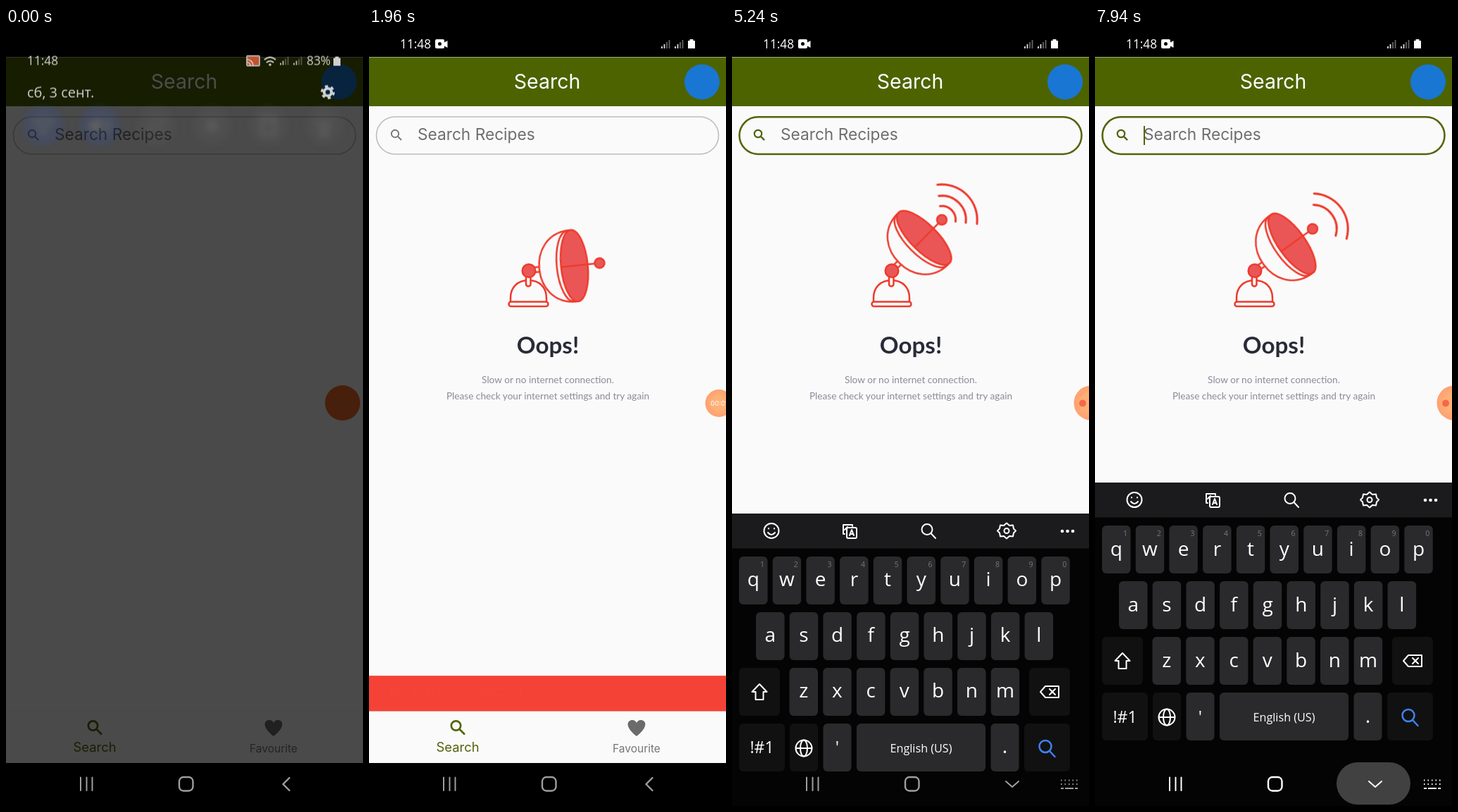
An HTML page for the animation above (8 s loop, 507x1104 px).

```html
<!DOCTYPE html>
<html lang="en">
<head>
<meta charset="utf-8">
<title>Recipe search</title>
<style>
html,body{margin:0;width:100%;height:100%;overflow:hidden;background:#000}
svg{display:block;width:100%;height:100%}
text{font-family:"Open Sans","Noto Sans",sans-serif;fill:#fff}
.geo text{font-family:Inter,sans-serif}
.geo .sans{font-family:"Open Sans",sans-serif}
.geo .lato{font-family:Lato,sans-serif;fill:#8b8b99}
.geo .rob{font-family:Roboto,sans-serif;fill:#fff2f0}
.mid{text-anchor:middle}
.ln{fill:none;stroke:#fff;stroke-width:2;stroke-linecap:round;stroke-linejoin:round}
.red{stroke:#ee3a2c;stroke-width:2.5;stroke-linecap:round;fill:none}
.wave{stroke-width:3}
.rf{fill:#ea5656}.wf{fill:#fafafa}
.olive{stroke:#52650a}
.a,.s{animation:8s linear infinite}
.s{animation-timing-function:step-end}

/* notification panel */
#app{animation-name:blur}
@keyframes blur{0%{filter:blur(.4px)}5%,16.25%{filter:blur(15px)}20.9%,100%{filter:blur(0)}}
#dim{animation-name:dim}
@keyframes dim{0%,16.25%{opacity:.7}20.9%,100%{opacity:0}}
#bar{animation-name:bar}
@keyframes bar{0%,18%{opacity:0}20.9%,100%{opacity:1}}
#head{animation-name:head}
@keyframes head{0%{opacity:.8;transform:translateY(-10.5px);animation-timing-function:ease-out}8%,16.25%{opacity:1;transform:none}20%,100%{opacity:0;transform:translateY(-14px)}}
#tiles{animation-name:tiles}
@keyframes tiles{0%{opacity:.12;filter:blur(4px);transform:translateY(-21px);animation-timing-function:ease-out}9%,16.25%{opacity:1;filter:blur(0);transform:none}20%,100%{opacity:0;filter:blur(0);transform:translateY(-30px)}}
#rest{animation-name:rest}
@keyframes rest{0%{opacity:0;transform:translateY(-50px)}2%{opacity:0;transform:translateY(-40px);animation-timing-function:ease-out}10.75%,16.25%{opacity:1;transform:none}19.5%,100%{opacity:0;transform:translateY(-50px)}}
#cast{animation-name:cast}
@keyframes cast{0%{transform:translateX(-22px)}11.9%{transform:none}}
#wifi{animation-name:wifi}
@keyframes wifi{0%{opacity:1}11.9%{opacity:0}}
#wtile{animation-name:wtile}
@keyframes wtile{0%,13.5%{fill:#2f64f5}14.8%,100%{fill:#6b6b6b}}

/* offline page */
#oops{animation-name:oops}
@keyframes oops{0%{opacity:0}22.2%{opacity:1}}
#dish{transform-origin:227px 344px;animation-name:dish}
@keyframes dish{0%,24.5%{transform:rotate(-5.7deg)}26.9%,39.5%{transform:rotate(-45.3deg)}41.75%{transform:rotate(-35.7deg)}45.4%{transform:rotate(-20.2deg)}46.75%{transform:rotate(-5.7deg)}48.9%,68.25%{transform:rotate(-45.3deg)}70.5%{transform:rotate(-35.7deg)}74.1%{transform:rotate(-20.2deg)}75.5%{transform:rotate(-5.7deg)}77.6%,97%{transform:rotate(-45.3deg)}99.25%,100%{transform:rotate(-35.7deg)}}
#w1{animation-name:w1}
@keyframes w1{0%{opacity:0}28.4%{opacity:1}40.2%{opacity:0}54%{opacity:1}69%{opacity:0}79.1%{opacity:1}97.75%{opacity:0}}
#w2{animation-name:w2}
@keyframes w2{0%{opacity:0}30.2%{opacity:1}43.9%{opacity:0}55.4%{opacity:1}72.6%{opacity:0}82%{opacity:1}}
#w3{animation-name:w3}
@keyframes w3{0%{opacity:0}33.9%{opacity:1}46%{opacity:0}58.2%{opacity:1}74.75%{opacity:0}84.9%{opacity:1}}
#snack{animation-name:snack}
@keyframes snack{0%,22.56%{transform:translateY(57px);animation-timing-function:cubic-bezier(.4,0,.2,1)}25.7%,45.75%{transform:none;animation-timing-function:ease-in}48.9%,100%{transform:translateY(57px)}}
#snacktext{animation-name:snacktext}
@keyframes snacktext{0%,24.5%{opacity:0}26%,45.75%{opacity:1}47.5%,100%{opacity:0}}

/* search field */
#focus{animation-name:focus}
@keyframes focus{0%{opacity:0}58.75%{opacity:1}}
#hint{animation-name:hint}
@keyframes hint{0%,73.4%{opacity:1}75%,89.4%{opacity:0}91.9%,100%{opacity:1}}
#c1{animation-name:c1}
@keyframes c1{0%{opacity:0}73.4%{opacity:1}76.9%{opacity:0}}
#c2{animation-name:c2}
@keyframes c2{0%{opacity:0}76.9%{opacity:1}89.4%{opacity:0}}
#clear{animation-name:clear}
@keyframes clear{0%{opacity:0}73.4%{opacity:1}89.4%{opacity:0}}
#caret{animation-name:caret}
@keyframes caret{0%{opacity:0}58.75%{opacity:1}65%{opacity:0}71.2%{opacity:1;transform:none}73.4%{transform:translateX(13.5px)}76.9%{opacity:1;transform:translateX(27px)}83.1%{opacity:0;transform:translateX(27px)}89.4%{opacity:1;transform:none}93.5%{opacity:0}98.7%{opacity:1}}

/* recorder bubble */
#b1{animation-name:b1}
@keyframes b1{0%{opacity:1}21.25%{opacity:0}}
#b2{animation-name:b2}
@keyframes b2{0%{opacity:0}21.25%{opacity:1}64%{opacity:0}}
#b3{animation-name:b3}
@keyframes b3{0%{opacity:0}64%{opacity:1}}
#t1{animation-name:t1}
@keyframes t1{0%{opacity:1}37.5%{opacity:0}}
#t2{animation-name:t2}
@keyframes t2{0%{opacity:0}37.5%{opacity:1}51.75%{opacity:0}}
#t3{animation-name:t3}
@keyframes t3{0%{opacity:0}51.75%{opacity:1}}

/* keyboard and system bar */
#kb{animation-name:kb}
@keyframes kb{0%,62.6%{transform:translateY(460px);animation-timing-function:ease-out}66.5%,100%{transform:none}}
#kc{animation-name:kc}
@keyframes kc{0%{opacity:0}71.9%{opacity:.25}73.7%{opacity:0}}
#kh{animation-name:kh}
@keyframes kh{0%{opacity:0}75.6%{opacity:.25}77%{opacity:0}}
#kgo{animation-name:kgo}
@keyframes kgo{0%{opacity:0}87.1%{opacity:.2}88.8%{opacity:0}}
#back{animation-name:back}
@keyframes back{0%{opacity:1}62.6%{opacity:0}}
#down{animation-name:down}
@keyframes down{0%{opacity:0}62.6%{opacity:1}}
#pill{animation-name:pill}
@keyframes pill{0%,97.5%{opacity:0}98.75%,100%{opacity:1}}
#nav{animation-name:nav}
@keyframes nav{0%,97.5%{opacity:.62}98.75%,100%{opacity:1}}
</style>
</head>
<body>
<svg viewBox="0 0 507 1104" preserveAspectRatio="none">
<defs>
  <g id="mag"><circle cx="-2" cy="-2" r="5.2"/><path d="M2 2L7 7"/></g>
  <g id="gear" fill="none"><circle r="5.2" stroke-width="4"/><circle r="8.3" stroke-width="3.4" stroke-dasharray="4.35 4.35"/></g>
  <g id="sig" stroke-width="1.8"><path d="M1 12V9M4.5 12V6" stroke="#ddd"/><path d="M8 12V3M11.5 12V0" stroke="#666"/></g>
  <path id="bat" fill="#fff" d="M2.5 0h5v2h2.5v11h-10v-11h2.5z"/>
  <path id="chev" class="ln" d="M-6-3L0 3L6-3"/>
  <radialGradient id="glow"><stop offset=".5" stop-color="#ffb077"/><stop offset="1" stop-color="#ffa070"/></radialGradient>
</defs>
<rect width="507" height="1104"/>

<g id="app" class="a geo">
  <rect x="-60" y="-60" width="627" height="1224"/>
  <rect x="-60" y="41" width="627" height="1002" fill="#fafafa"/>
  <rect x="-60" y="41.5" width="627" height="69.5" fill="#4d6300"/>
  <text class="mid" x="253" y="85.500" font-size="28.500">Search</text>
  <circle cx="473" cy="76.500" r="25" fill="#1976d2"/>
  <g id="bar" class="a">
    <text class="sans" x="44" y="29" font-size="17.300">11:48</text>
    <rect x="94" y="16" width="13" height="13" rx="2" fill="#fff"/>
    <path d="M106 21l5.500-3v10l-5.500-3z" fill="#fff"/><circle cx="100.500" cy="22.500" r="2.500"/>
    <use href="#sig" x="415" y="17"/><use href="#sig" x="434" y="17"/><use href="#bat" x="453" y="16"/>
  </g>

  <rect x="10.500" y="126" width="486" height="53" rx="26.500" fill="none" stroke="#bdbdbd" stroke-width="1.600"/>
  <use href="#mag" x="39" y="152" fill="none" stroke="#757575" stroke-width="1.900"/>
  <text id="hint" class="a" x="69" y="159" font-size="22.700" style="fill:#6e6e6e">Search Recipes</text>
  <g id="focus" class="s">
    <rect x="10.500" y="126.300" width="486" height="52.600" rx="26.300" fill="none" class="olive" stroke-width="2.500"/>
    <use href="#mag" x="39" y="152" fill="none" class="olive" stroke-width="2.200"/>
  </g>
  <text id="c1" class="s" x="69" y="159" font-size="22.700" style="fill:#222">c</text>
  <text id="c2" class="s" x="69" y="159" font-size="22.700" style="fill:#222">ch</text>
  <g id="clear" class="s"><circle cx="467.500" cy="152.500" r="9.500" fill="#4d6300"/><path class="ln" d="M464 149l7 7m0-7l-7 7"/></g>
  <rect id="caret" class="s" x="69" y="139" width="2" height="27" fill="#52650a"/>

  <g id="oops" class="s">
    <path class="red" d="M201 388V383C201 367 212 358 226.500 358S252 367 252 383V388"/>
    <rect class="red wf" x="198.500" y="388.500" width="56" height="6.500" rx="3.200"/>
    <rect class="red wf" x="223" y="350" width="6.500" height="16.500" rx="3"/>
    <g id="dish" class="a"><g transform="translate(227 344)">
      <rect class="red wf" x="7" y="-3.500" width="12" height="7"/>
      <path class="red wf" d="M62-51C30-50 15-25 15 0S30 50 62 51"/>
      <ellipse class="red wf" cx="60" rx="20" ry="50.500"/>
      <ellipse class="red rf" cx="65" rx="19" ry="51"/>
      <path class="red" d="M48 0H94"/>
      <circle class="red rf" cx="101" r="7"/>
      <g transform="translate(101 0)">
        <path id="w1" class="s red wave" d="M12-15.500A19.500 19.500 0 0 1 12 15.500"/>
        <path id="w2" class="s red wave" d="M21-27A34.200 34.200 0 0 1 21 27"/>
        <path id="w3" class="s red wave" d="M31-39.500A50.200 50.200 0 0 1 31 39.500"/>
      </g>
    </g></g>
    <circle class="red rf" cx="227" cy="344.500" r="9.300"/>
    <text class="mid lato" x="254" y="461.500" font-size="33.200" font-weight="700" style="fill:#2a2b38">Oops!</text>
    <g font-size="13.650" class="mid">
      <text class="lato" x="254" y="504">Slow or no internet connection.</text>
      <text class="lato" x="254" y="527">Please check your internet settings and try again</text>
    </g>
  </g>

  <rect id="snack" class="a" y="913" width="507" height="57" fill="#f44336"/>
  <text id="snacktext" class="a rob" x="30" y="947" font-size="18.600">No internet connection</text>
  <rect x="-60" y="969.500" width="627" height="73.500" fill="#fafafa"/>
  <path d="M0 969H507" stroke="#000" opacity=".04"/>
  <g fill="none" class="olive" stroke-width="2.700"><circle cx="123.500" cy="990" r="6.700"/><path d="M128.500 995l7.500 7.500"/></g>
  <text class="mid" x="126" y="1026.500" font-size="18.400" style="fill:#52650a">Search</text>
  <path d="M380 1005C362 991 367 982 374 982Q378 982 380 986Q382 982 386 982C393 982 398 991 380 1005Z" fill="#6b6b6b"/>
  <text class="mid" x="380" y="1027.500" font-size="15.500" style="fill:#757575">Favourite</text>
  <rect x="-60" y="1043" width="627" height="121"/>

  <g id="b1" class="s"><circle cx="478" cy="532" r="25" fill="#f26a26"/><text class="mid" x="478" y="536" font-size="12" style="fill:#d87a3a">00:00</text></g>
  <g id="b2" class="s">
    <circle cx="497" cy="532.500" r="19.500" fill="url(#glow)"/>
    <g font-size="9.500"><text id="t1" class="s" x="485" y="536">00:01</text><text id="t2" class="s" x="485" y="536">00:02</text><text id="t3" class="s" x="485" y="536">00:03</text></g>
  </g>
  <g id="b3" class="s"><circle cx="510" cy="532" r="24.500" fill="url(#glow)"/><circle cx="498" cy="532.500" r="5" fill="#f4694a"/></g>
</g>

<rect id="dim" class="a" width="507" height="1104"/>

<g id="head" class="a">
  <text x="30" y="63" font-size="17.300">11:48</text>
  <g id="cast" class="s"><rect x="364" y="50" width="18" height="14" rx="1" fill="#f2603a" stroke="#ddd" stroke-width="1.800"/><path d="M364 55a9 9 0 0 1 9 9M364 59a5 5 0 0 1 5 5" fill="none" stroke="#fff" stroke-width="1.600"/></g>
  <g id="wifi" class="s ln"><path d="M367.500 55q7.500-6 15 0M370.500 59q4.500-3.500 9 0"/><circle cx="375" cy="62.500" r=".8"/></g>
  <use href="#sig" x="389" y="51"/><use href="#sig" x="408" y="51"/>
  <text x="427" y="63" font-size="17.300">83%</text>
  <use href="#bat" x="465" y="51"/>
  <text x="30" y="109" font-size="20">сб, 3 сент.</text>
  <use href="#gear" x="457" y="101.500" stroke="#fff"/>
</g>

<g id="tiles" class="a">
  <g fill="#6b6b6b"><circle id="wtile" class="a" cx="53" cy="159.500" r="28.800"/><circle cx="133" cy="159.500" r="28.800" fill="#2f64f5"/><circle cx="213" cy="159.500" r="28.800"/><circle cx="292.500" cy="159.500" r="28.800"/><circle cx="372.500" cy="159.500" r="28.800"/><circle cx="452.500" cy="159.500" r="28.800"/></g>
  <g class="ln" style="stroke-width:3"><path d="M38 155q15-13 30 0M43 161q10-9 20 0M48 167q5-4 10 0"/><circle cx="53" cy="171" r="1"/></g>
  <path d="M118 154h7l9-7v25l-9-7h-7z" fill="#fff"/><path class="ln" style="stroke-width:2.600" d="M138 154q5 5.500 0 11M143 150q9 9.500 0 19"/>
  <path class="ln" style="stroke:#bbb;stroke-width:2.600" d="M207 149v20m-5-5l5 5l5-5M220 170v-20m-5 5l5-5l5 5"/>
  <circle cx="292.500" cy="159.500" r="10" fill="#bbb"/>
  <rect x="360" y="145" width="25" height="29" rx="3" fill="#bbb"/><rect x="366.500" y="159" width="12" height="9" fill="#6b6b6b"/><path d="M369 159v-3a3.500 3.500 0 0 1 7 0v3" fill="none" stroke="#6b6b6b" stroke-width="2"/>
  <path d="M441 155h22l-5 8v12h-12v-12zM444 145l2 6M452 144v7M460 145l-2 6" fill="#bbb" stroke="#bbb" stroke-width="2.200"/><circle cx="452" cy="164" r="2" fill="#555"/>
</g>

<g id="rest" class="a">
  <circle cx="41.500" cy="229" r="6" fill="#999"/><circle cx="41.500" cy="229" r="10.500" fill="none" stroke="#999" stroke-width="2.500" stroke-dasharray="2 6.247"/>
  <path d="M360 228.500H423" stroke="#592b1b" stroke-width="4.800"/><path d="M83 228.500H360" stroke="#2f64f5" stroke-width="4.800"/>
  <circle cx="359.500" cy="228.500" r="10.500" fill="#2f64f5"/>
  <use href="#chev" x="461" y="229"/>
  <text x="37" y="287" font-size="17">Уведомления с оповещением</text>
  <rect x="12" y="298.500" width="483" height="84" rx="25" fill="#fff"/>
  <g fill="#ff6a0a"><path d="M82 319h7.500v23h-7.500zM94.500 319h7.500v23h-7.500zM242 320h22v21.500h-22z"/><rect x="400.500" y="320" width="28" height="22" rx="3"/><path d="M408 321v-4h13v4" fill="none" stroke="#ff6a0a" stroke-width="2.500"/></g>
  <circle cx="414.500" cy="331" r="7" fill="#fff"/><path d="M412 328.500l5.500 5.500" stroke="#ff6a0a" stroke-width="2.500"/>
  <g font-size="13.800" class="mid"><text x="92" y="362" style="fill:#444">Пауза</text><text x="252.500" y="362" style="fill:#444">Стоп</text><text x="414" y="364" style="fill:#444">Инструменты</text></g>
  <text x="37" y="415" font-size="17">Уведомления без звука</text>
  <rect x="12" y="427" width="483" height="53" rx="25" fill="#303030"/>
  <path d="M43.500 446.500l7 5l-7 5l-7-5z" fill="#fff"/><path d="M37 455.500l6.500 4.500l6.500-4.500" class="ln"/>
  <text x="59" y="460" font-size="15.800" style="fill:#d8d8d8">Платфор...</text>
  <text x="156" y="460" font-size="15.400" style="fill:#c8c8c8">QTapelog: поверх других прилож...</text>
  <use href="#chev" x="463" y="455" opacity=".5"/>
  <text x="213" y="507" font-size="13.400" font-weight="600" style="fill:#b4b4b4">Настройки уведомлений</text>
  <text x="404" y="507" font-size="13.800" style="fill:#6c6c6c">Очистить</text>
  <text class="mid" x="254" y="1024" font-size="13.500" style="fill:#8d8d8d">Nelvine QT | ili</text>
</g>

<g id="kb" class="a">
  <rect y="645" width="507" height="460" fill="#040404"/>
  <rect y="645" width="507" height="49.500" fill="#1b1b1d"/>
  <g class="ln">
    <circle cx="56" cy="669.500" r="10.500"/><path d="M51 672q5 6 10 0M52 666v.5M60 666v.5"/>
    <rect x="163" y="665" width="14" height="15" rx="2"/><path d="M160 674h-2v-13h13v2M167 676l3-8l3 8M168 674h4M160 668l4-4"/>
    <circle cx="277" cy="667.500" r="7.500"/><path d="M282.500 673l6.500 7"/>
    <path d="M390 658.500l4 3.500l5-.5l1 5l3 3l-3 3l-1 5l-5-.5l-4 3.500l-4-3.500l-5 .5l-1-5l-3-3l3-3l1-5l5 .5z"/><circle cx="390" cy="669.500" r="3.500"/>
  </g>
  <g fill="#fff"><circle cx="469" cy="670" r="2.300"/><circle cx="476.500" cy="670" r="2.300"/><circle cx="484" cy="670" r="2.300"/></g>
  <g id="keys"></g>
  <g class="ln">
    <path d="M39 887l10.500 11h-5v11h-11v-11h-5z"/>
    <path d="M438 898l7-8h19v16h-19zM451 894l8 8m0-8l-8 8"/>
    <circle cx="102" cy="978" r="11.500"/><ellipse cx="102" cy="978" rx="5" ry="11.500"/><path d="M91 978h22"/>
    <g style="stroke:#3f83f0;stroke-width:2.500"><circle cx="445" cy="975.500" r="8.500"/><path d="M451 982l7.500 8"/></g>
  </g>
  <g fill="#fff"><rect id="kc" class="s" x="177" y="864" width="40.500" height="68" rx="6"/><rect id="kh" class="s" x="272.500" y="785" width="40.500" height="68" rx="6"/><rect id="kgo" class="s" x="415" y="943" width="65" height="68" rx="6"/></g>
</g>

<rect id="pill" class="a" x="343" y="1042" width="105" height="60" rx="30" fill="#414141"/>
<g id="nav" class="a ln">
  <path d="M106 1063.500v18.500M114.500 1063.500v18.500M122.500 1063.500v18.500"/>
  <rect x="246" y="1063" width="19.500" height="19.500" rx="6" style="stroke-width:2.400"/>
  <path id="back" class="s" d="M402.500 1064l-9 9l9 9" style="stroke-width:2.400"/>
  <g id="down" class="s"><path d="M389 1069l9 8l9-8"/><path d="M467 1067.500h24M467 1073h24" stroke-dasharray="1.500 4" stroke-linecap="butt"/><path d="M467 1079h4M473 1079h12M487 1079h4" stroke-linecap="butt"/></g>
</g>
</svg>
<script>
const keys = document.getElementById('keys');
const add = (name, attrs, text = '') => {
  const el = document.createElementNS('http://www.w3.org/2000/svg', name);
  for (const k in attrs) el.setAttribute(k, attrs[k]);
  el.textContent = text;
  keys.append(el);
};
const key = (x, y, w, label = '', size = 28, fill = '#2a2a2c') => {
  add('rect', {x, y, width: w, height: 68, rx: 6, fill});
  add('text', {x: x + w / 2, y: y + (size < 20 ? 41 : 42.5), 'font-size': size, class: 'mid'}, label);
};
const step = 47.7, dark = '#111112';
[['qwertyuiop', 10, 706], ['asdfghjkl', 34, 785], ['zxcvbnm', 81.5, 864]].forEach(([row, x, y]) =>
  [...row].forEach((ch, i) => key(x + i * step, y, 40.5, ch)));
for (let i = 0; i < 10; i++)
  add('text', {x: 43 + i * step, y: 721, 'font-size': 10.5, class: 'mid', style: 'fill:#777'}, (i + 1) % 10);
key(10, 864, 58, '', 28, dark);
key(422, 864, 58, '', 28, dark);
key(10, 943, 65, '!#1', 23, dark);
key(82, 943, 40, '', 28, dark);
key(129.5, 943, 40, "'", 24);
key(177, 943, 183, 'English (US)', 16.2);
key(367.5, 943, 40, '.', 28);
key(415, 943, 65, '', 28, dark);
</script>
</body>
</html>
```
